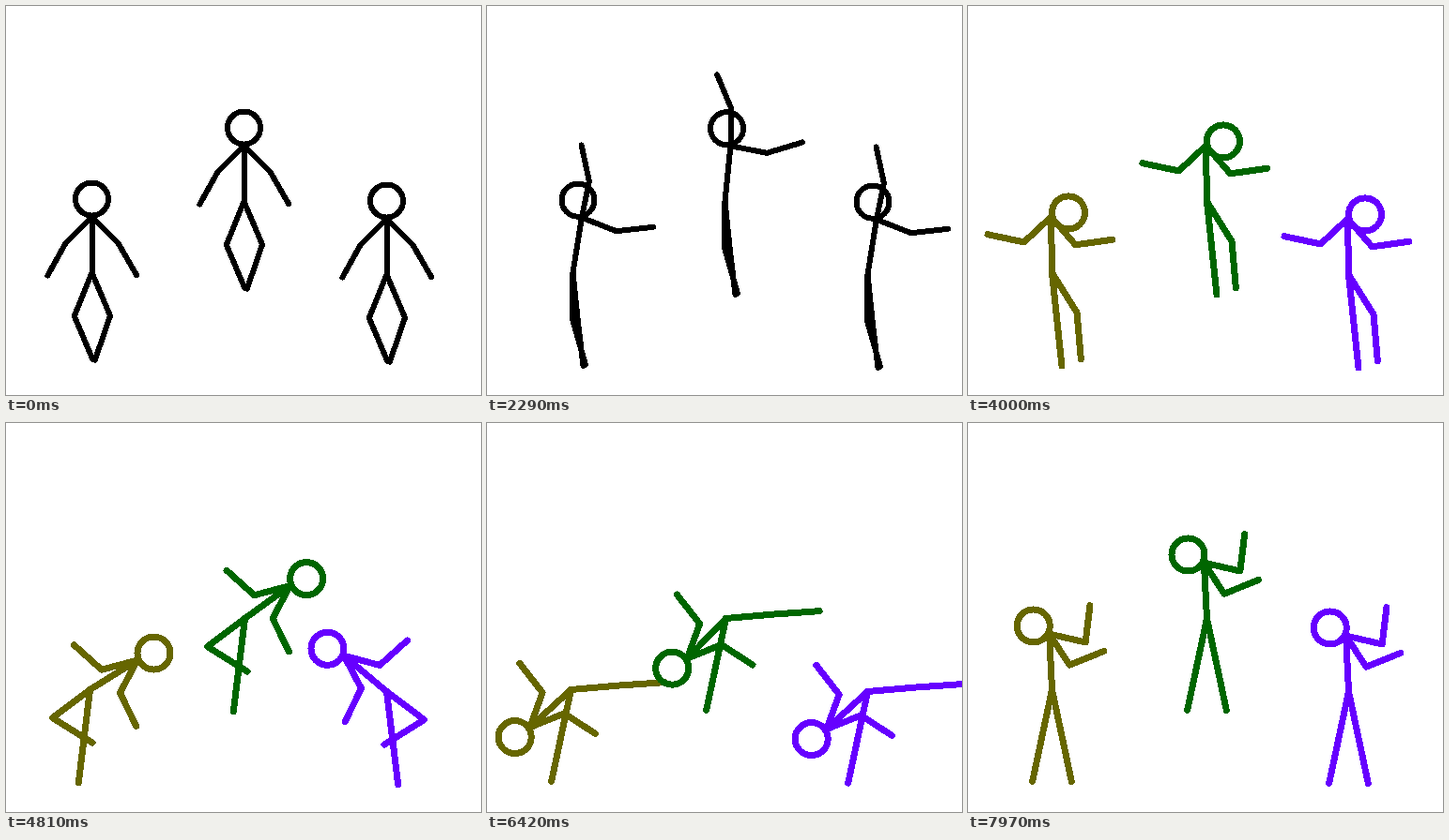
Write an HTML page that moves like this. It is 506 by 415 pixels and loops after 8 s.

```html
<!DOCTYPE html>
<html>
<head>
<meta charset="utf-8">
<style>
  html, body { margin: 0; width: 100%; height: 100%; overflow: hidden; background: #fff; }
  svg { display: block; }
  path { fill: none; stroke-linecap: round; stroke-linejoin: round; shape-rendering: crispEdges; }
</style>
</head>
<body>
<svg id="stage" width="506" height="415"></svg>
<script>
const LOOP = 8000, STEP = 80, COLOUR_TIME = 2300;
const TORSO = 59.5, NECK = 19, HEAD = 17.5, ARM = 39.5, LEG = 50;

const dancers = [
  { x: 91, colouredX: 89, y: 284, colour: '#666600', outer: true },
  { x: 253, colouredX: 254, y: 208, colour: '#006600' },
  { x: 405, colouredX: 405, y: 286, colour: '#6600ff', outer: true, turns: true }
];

// Directions are degrees clockwise from straight up; limbs are [upper, lower].
// droop lowers the arms of the outer dancers.
const stand = {
  torso: 0, head: 0, droop: 0,
  armA: [-135, -151], armB: [135, 150], legA: [157, 199], legB: [202, 157]
};
const kick = { legA: [131, 70], legB: [187, 156] };
const straight = angle => [angle, angle];

const keys = [
  { time: 0, ...stand },
  { time: 900, ...stand, ...kick },
  { time: 1500, ...stand, ...kick, torso: -35, head: -27, armA: [-120, -113], armB: [74, 69] },
  { time: 3030, torso: 51, head: 5, droop: 22,
    armA: [136, 78], armB: [131, 78], legA: [222, 288], legB: straight(173) },
  { time: 4000, torso: -1, head: 76, droop: 0,
    armA: [227, 282], armB: [139, 82], legA: [148, 175], legB: straight(174) },
  { time: 4810, torso: 54, head: 67, droop: 0, facing: true,
    armA: [255, 312], armB: [208, 154], legA: [233, 122], legB: straight(187) },
  { time: 6420, torso: -136, head: -123, droop: 0,
    armA: [380, 322], armB: [68, 123], legA: [85, 86], legB: straight(192) },
  { time: 7900, torso: -3, head: -63, droop: 0,
    armA: [463, 367], armB: [147, 68], legA: straight(168), legB: straight(192) }
];

const radians = degrees => degrees * Math.PI / 180;

function mirror(pose) {
  const flip = limb => limb.map(angle => 360 - angle);
  return { torso: -pose.torso, head: -pose.head,
    armA: flip(pose.armB), armB: flip(pose.armA),
    legA: flip(pose.legA), legB: flip(pose.legB) };
}

// Returns all directions of one dancer at one key, as a flat list.
function directions(key, dancer) {
  const { torso, head, armA, armB, legA, legB } =
    key.facing && dancer.turns ? mirror(key) : key;
  const lean = dancer.outer ? 5 * Math.abs(Math.sin(radians(torso))) : 0;
  const droop = dancer.outer ? key.droop : 0;
  const arms = [...armA, ...armB].map(angle => angle + droop);
  return [torso + lean, head, ...arms, ...legA, ...legB];
}

function poseAt(time, dancer) {
  const next = keys.findIndex(key => key.time > time);
  if (next < 0) return directions(keys[keys.length - 1], dancer);
  const from = keys[next - 1], to = keys[next];
  const span = to.time - from.time, steps = Math.round(span / STEP);
  const progress = Math.floor((time - from.time) / span * steps) / steps;
  const end = directions(to, dancer);
  return directions(from, dancer).map((a, i) => a + (end[i] - a) * progress);
}

const move = ([x, y], angle, length) =>
  [x + Math.sin(radians(angle)) * length, y - Math.cos(radians(angle)) * length];

function limb(start, upper, lower, length) {
  const joint = move(start, upper, length);
  return `M${start}L${joint}L${move(joint, lower, length)}`;
}

function outline(hip, [torso, head, ...limbs]) {
  const neck = move(hip, torso, TORSO);
  const [x, y] = move(neck, head, NECK);
  const half = `a${HEAD},${HEAD} 0 0 1 `;
  const parts = [neck, neck, hip, hip].map((joint, i) =>
    limb(joint, limbs[2 * i], limbs[2 * i + 1], joint === neck ? ARM : LEG));
  return `M${hip}L${neck}M${x - HEAD},${y}${half}${2 * HEAD},0${half}${-2 * HEAD},0z` + parts.join('');
}

const stage = document.getElementById('stage');
for (const dancer of dancers) {
  dancer.path = document.createElementNS('http://www.w3.org/2000/svg', 'path');
  dancer.path.setAttribute('transform', 'translate(0.5 0.5)');
  stage.append(dancer.path);
}

const start = performance.now();
function tick() {
  const time = (performance.now() - start) % LOOP;
  const coloured = time >= COLOUR_TIME;
  for (const dancer of dancers) {
    const hip = [coloured ? dancer.colouredX : dancer.x, dancer.y];
    dancer.path.setAttribute('d', outline(hip, poseAt(time, dancer)));
    dancer.path.setAttribute('stroke', coloured ? dancer.colour : '#000');
    dancer.path.setAttribute('stroke-width', coloured ? 7 : 6);
  }
  requestAnimationFrame(tick);
}
tick();
</script>
</body>
</html>
```
